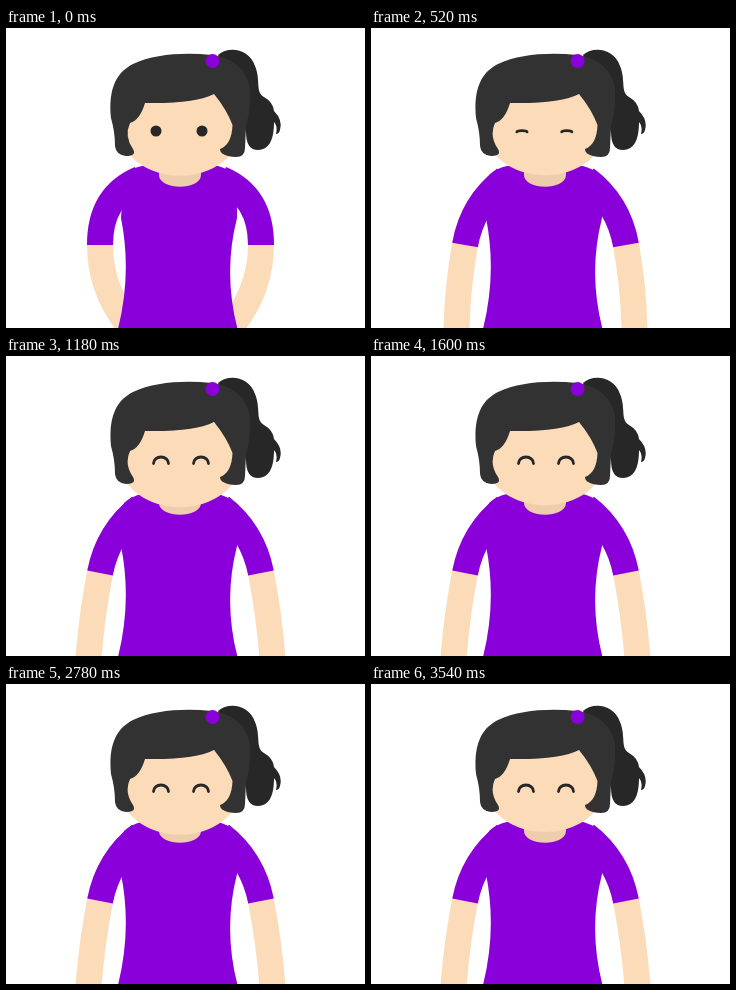
Recreate the animation shown at these times as an HTML page. Size 359 px wide and 300 px high, loop 3560 ms.

```html
<!DOCTYPE html>
<html lang="en">
<head>
<meta charset="utf-8">
<title>Smiling girl</title>
<style>
  html, body { margin: 0; width: 100%; height: 100%; overflow: hidden; background: #fff; }
  svg { display: block; width: 100vw; height: 100vh; }
  .skin { fill: #fcdbb9; }
  .shirt { fill: #8a00da; }
  .hair { fill: #323232; }
  .limb { fill: none; stroke-width: 26; }
  .smile { fill: none; stroke: #272727; stroke-width: 2.8; stroke-linecap: round; }
</style>
</head>
<body>
<svg viewBox="0 0 359 300">
  <g id="arm">
    <path id="limb" class="limb" stroke="#fcdbb9"/>
    <path id="sleeve" class="limb" stroke="#8a00da"/>
  </g>
  <use href="#arm" transform="translate(349) scale(-1 1)"/>
  <path class="shirt" d="M136 138H212Q221 140 231 148V190Q217 245 231.500 301H112Q126 245 115 190L118 147Q126 140 136 138Z"/>
  <path fill="#eecdac" d="M153 128V147C153 162.500 195 162.500 195 147V128Z"/>
  <ellipse id="face" class="skin" cx="174" rx="60" ry="46"/>
  <path fill="#272727" d="M212 27C222 18 243 20 249 38C255 52 249 64 258 69Q267 74 268 83Q277 92 274 102Q273 106 270 106Q272 98 268 94C268 108 265 122 252 122Q240 122 240 104L225 60Z"/>
  <path class="hair" d="M109 118Q109 104 105 90C102 60 111 44 127 36C148 26 178 24 206 27C228 30 242 43 244 62Q245 80 240 98L239 120Q239 129 230 129Q214 128 214 121C222 118 226 110 226.500 97Q221 82 208 66Q189 76 139 75Q134 92 124 95Q118 108 127 121Q131 128 120 128Q110 127 109 118Z"/>
  <circle class="shirt" cx="206.500" cy="33" r="7"/>
  <g id="eyes"></g>
</svg>
<script>
const LOOP = 3560, ARM_TIME = 620, BLINK = 430, SMILE_END = 740;
const BOB = LOOP / 2, BOB_LOW = 1200;

// The arm is one smooth curve: shoulder, upper-arm bend, cuff, hand.
const SHOULDER = [134, 151], CUFF = [94, 217];
const HIPS = { bend: [94, 168], hand: [130, 306] };
const RELAXED = { bend: [102, 176], hand: [82.5, 302] };
const EYES = [{ dot: 150, smile: 155 }, { dot: 196, smile: 195 }];

const $ = id => document.getElementById(id);
const clamp = v => Math.min(1, Math.max(0, v));
const mix = (a, b, p) => a + (b - a) * p;
const mixPoint = (a, b, p) => a.map((v, i) => mix(v, b[i], p));
const easeInOut = p => (1 - Math.cos(Math.PI * p)) / 2;

function drawArms(t) {
  const p = easeInOut(clamp(t / ARM_TIME));
  const upper = `M${SHOULDER}Q${mixPoint(HIPS.bend, RELAXED.bend, p)} ${CUFF}`;
  $("sleeve").setAttribute("d", upper);
  $("limb").setAttribute("d", `${upper}T${mixPoint(HIPS.hand, RELAXED.hand, p)}`);
}

function eyeMarkup({ dot, smile }, t) {
  if (t < BLINK) {
    return `<ellipse cx="${dot}" cy="103" rx="5.5" ry="${5.5 * (1 - t / BLINK)}" fill="#272727"/>`;
  }
  const p = easeInOut(clamp((t - BLINK) / (SMILE_END - BLINK)));
  const x = mix(dot, smile, p), w = mix(4.5, 7.5, p), h = 6.5 * p;
  return `<path class="smile" d="M${x - w} ${mix(103, 107.5, p)}a${w} ${h} 0 0 1 ${2 * w} 0"/>`;
}

function draw(t) {
  drawArms(t);
  $("eyes").innerHTML = EYES.map(eye => eyeMarkup(eye, t)).join("");
  const bob = Math.cos((t - BOB_LOW) / BOB * 2 * Math.PI);
  $("face").setAttribute("cy", 102.9 + 2.4 * bob);
}

const start = performance.now();
function tick() {
  draw((performance.now() - start) % LOOP);
  requestAnimationFrame(tick);
}
tick();
</script>
</body>
</html>
```
